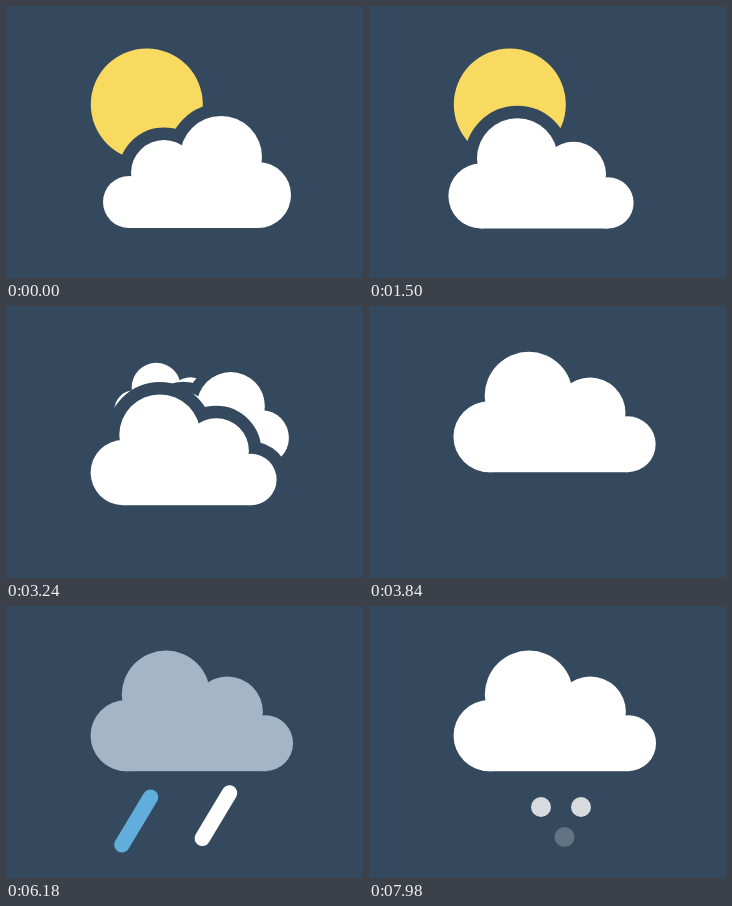
An HTML page for the animation above (8 s loop, 357 px wide and 272 px high).

```html
<!DOCTYPE html>
<html lang="en">
<head>
<meta charset="utf-8">
<title>Weather</title>
<style>
  html, body { margin: 0; width: 100%; height: 100%; overflow: hidden; background: #34495e; }
  svg { display: block; width: 100vw; height: 100vh; }
</style>
</head>
<body>
<svg id="stage" viewBox="0 0 357 272"></svg>
<script>
const LOOP = 8000;
const SKY = '#34495e', SUN = '#f9da61', BLUE = '#61addb', WHITE = '#fff';
const stage = document.getElementById('stage');

function add(tag, attrs, parent = stage) {
  const el = document.createElementNS('http://www.w3.org/2000/svg', tag);
  set(el, attrs);
  parent.appendChild(el);
  return el;
}
function set(el, attrs) {
  for (const k in attrs) el.setAttribute(k, attrs[k]);
}
const show = (el, on) => set(el, { visibility: on ? 'visible' : 'hidden' });

// Easing
const clamp = v => Math.max(0, Math.min(1, v));
const span = (t, start, length) => clamp((t - start) / length);
const mix = (a, b, p) => a + (b - a) * p;
const out = p => 1 - (1 - p) ** 2;
const backIn = (p, k) => p * p * ((k + 1) * p - k);
// Damped spring from rest, overshooting by 15%.
const spring = p => p >= 1 ? 1 : 1 - Math.exp(-3.6 * p) * (Math.cos(6 * p) + 0.6 * Math.sin(6 * p));

// Cloud coordinates start at the middle of its base.
const LOBES = [[-68, -26, 26], [-33, -55, 33], [24, -71, 41], [61, -33, 33]];
function makeCloud(flip) {
  const root = add('g', {});
  const rim = add('g', { fill: SKY, stroke: SKY, 'stroke-width': 25, 'stroke-linejoin': 'round' }, root);
  const body = add('g', { fill: WHITE }, root);
  for (const g of [rim, body]) {
    for (const [cx, cy, r] of LOBES) add('circle', { cx, cy, r }, g);
    add('rect', { x: -68, y: -45, width: 129, height: 45 }, g);
  }
  return { root, body, side: flip ? -1 : 1 };
}
function place({ root, side }, x, y, s, opacity) {
  set(root, { transform: `translate(${x} ${y}) scale(${side * s} ${s})`, opacity });
}

const sun = add('circle', { cx: 140.8, cy: 98.4, fill: SUN });
const first = makeCloud(false);
const third = makeCloud(true);
const back = makeCloud(false);
const front = makeCloud(true);
const bolt = add('path', { d: 'M173 177H195L185 200H202L159 246L170 213H154Z', fill: SUN });

const drops = [];
for (const start of [5390, 5974, 6630, 6890]) {
  for (const [delay, x, stroke] of [[0, 147, BLUE], [26, 223.5, WHITE]]) {
    drops.push({ start: start + delay, x, el: add('line', { stroke, 'stroke-linecap': 'round' }) });
  }
}
const flakes = [[172, 201], [212, 201], [195.5, 231]]
  .map(([cx, cy]) => ({ start: cy > 201 ? 7900 : 7700, el: add('circle', { cx, cy, r: 10, fill: WHITE }) }));

function drawClouds(t) {
  const leave = span(t, 630, 160);
  place(first, 191 - 32 * leave, 222, 1, 1 - leave);

  const enter = spring(span(t, 630, 600));
  const rise = spring(span(t, 3120, 750));
  const grow = spring(span(t, 3210, 660));
  const kick = span(t, 4380, 450);
  const recoil = 8 * Math.exp(-3 * kick) * Math.sin(2 * Math.PI * kick);
  place(front,
    mix(111, 172, enter) + 13.8 * rise - recoil,
    222.5 - 57.3 * rise,
    mix(0.854, 0.985, enter) + 0.092 * grow,
    span(t, 630, 40));

  const emerge = out(span(t, 1500, 330));
  place(back,
    mix(180, 211, emerge) - 15 * rise,
    mix(190, 155, emerge) + 10 * rise,
    mix(0.4, 0.83, emerge),
    t >= 1500 ? 1 : 0);

  place(third, mix(150, 186, rise), mix(106, 150, rise), out(span(t, 3120, 330)), t >= 3120 ? 1 : 0);

  const grey = span(t, 4380, 240) - span(t, 7440, 300);
  set(front.body, { fill: `rgb(${[164, 181, 200].map(v => Math.round(mix(255, v, grey)))})` });
}

function drawBolt(t) {
  const fall = 100 * span(t, 5130, 330) ** 2;
  const size = spring(span(t, 4440, 390));
  set(bolt, { transform: `translate(${180 - fall * 0.4} ${177 + fall}) scale(${size}) translate(-180 -177)` });
  show(bolt, size > 0 && fall < 100);
}

// Each drop stretches down a slanted line, then its tail catches up.
function drawDrop({ start, x, el }, t) {
  const head = span(t, start, 300), tail = span(t, start + 190, 300);
  set(el, {
    x1: x - 45 * tail, y1: 187 + 75 * tail,
    x2: x - 45 * head, y2: 187 + 75 * head,
    'stroke-width': 15.5 * Math.min(1, head * 6, (1 - tail) * 6)
  });
  show(el, head > 0 && tail < 1);
}

function draw(t) {
  set(sun, { r: 56 * (1 - backIn(span(t, 2250, 600), 2.9)) });
  drawClouds(t);
  drawBolt(t);
  for (const d of drops) drawDrop(d, t);
  for (const f of flakes) set(f.el, { opacity: span(t, f.start, 350) });
}

const begin = performance.now();
function tick() {
  draw((performance.now() - begin) % LOOP);
  requestAnimationFrame(tick);
}
tick();
</script>
</body>
</html>
```
